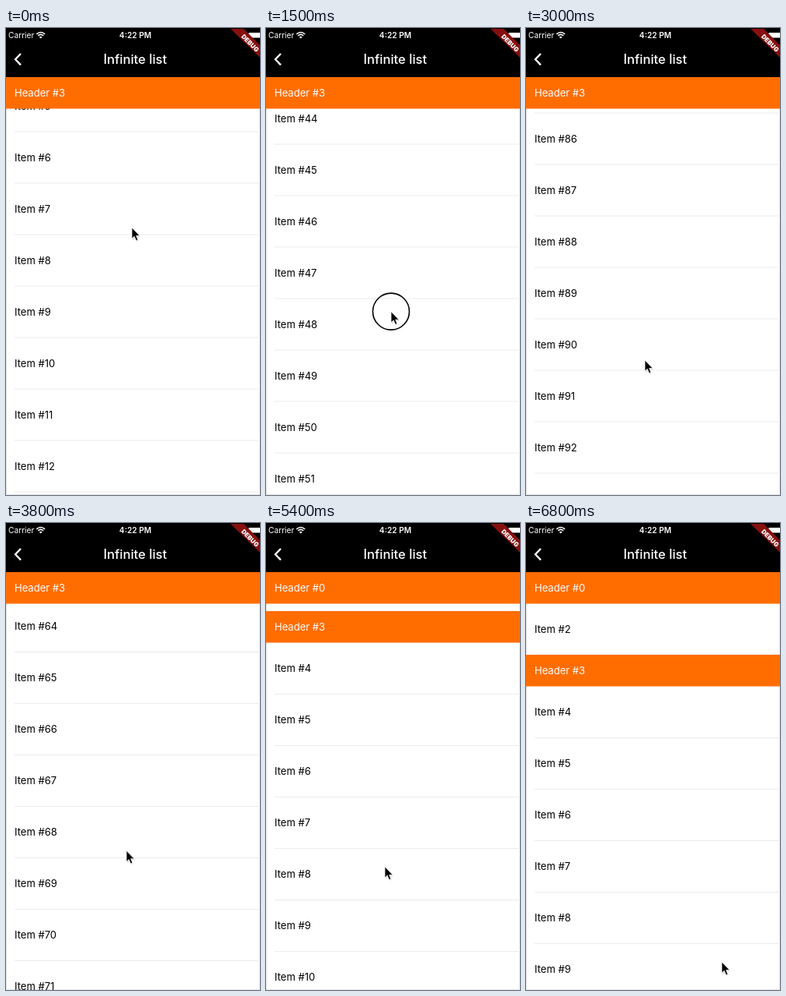
An HTML page for the animation above (6.9 s loop, 327x599 px).

```html
<!DOCTYPE html>
<html lang="en">
<head>
<meta charset="utf-8">
<title>Infinite list</title>
<style>
  html, body { margin: 0; width: 100%; height: 100%; overflow: hidden; background: #fff; }
  svg { display: block; width: 327px; height: 599px; }
  text { font-family: Inter, Roboto, sans-serif; font-size: 13px; }
</style>
</head>
<body>
<svg viewBox="0 0 327 599">
  <rect width="327" height="599" fill="#fff"/>
  <path d="M.5 63V598.5H326.5V63" fill="none" stroke="#e3e3e3"/>
  <g id="rows"></g>
  <g id="heads"></g>

  <rect width="327" height="63" fill="#000"/>
  <g fill="#fff">
    <text x="3" y="13.3" style="font-size:10.2px">Carrier</text>
    <text x="166.5" y="13.3" text-anchor="middle" style="font-size:10.2px;font-weight:600">4:22 PM</text>
    <text x="166.3" y="46" text-anchor="middle" style="font-size:16.6px;font-weight:500">Infinite list</text>
    <rect x="312" y="6" width="18" height="6.5" rx="1.5"/>
    <path d="M44.7 13.6L42.7 11.4Q44.7 9.9 46.7 11.4Z"/>
  </g>
  <g fill="none" stroke="#fff">
    <path d="M41.2 9.9Q44.7 6.9 48.2 9.9M39.3 7.9Q44.7 3.1 50.1 7.9" stroke-width="1.6"/>
    <path d="M19 33L12 40.2L19 47.4" stroke-width="2.3"/>
  </g>
  <path d="M289 1H306L327 22V38Z" fill="#85100f"/>
  <text transform="translate(314.5 19.2) rotate(45)" y="3" text-anchor="middle" fill="#fff"
        style="font-size:8px;font-weight:900">DEBUG</text>
  <rect width="327" height="1" fill="#000"/>

  <g id="pointer">
    <circle id="ring" r="23.5" fill="none" stroke="#000" stroke-width="1.6"/>
    <path d="M1 2V16L4.2 13.2L6.5 18L8.7 17L6.8 12.2H11Z" fill="#000" opacity=".14"/>
    <path d="M0 0V14.2L3.2 11.3L5.5 16.7L7.9 15.7L5.7 10.5H10.2Z" fill="#000" stroke="#fff" stroke-width=".8"/>
  </g>
</svg>
<script>
  const LOOP = 6900, STEP = 100;
  const TOP = 63, HEAD = 40.5, ROW = 66, BOTTOM = 599;

  // [time, value] pairs
  const scroll = [
    [0, 275], [300, 590], [700, 800], [900, 1006], [1000, 1150], [1400, 2480],
    [1600, 3250], [1800, 4560], [2100, 5929], [2200, 6110], [2500, 6120],
    [2750, 5965], [3000, 5579], [3400, 4960], [3600, 4660], [4000, 3560],
    [4600, 2214.5], [4800, 1880], [5000, 1320], [5300, 360], [5500, 0],
    [5900, 0], [6300, 42], [6600, 63], [6800, 66.5]
  ];
  const pointX = [[0, 162], [900, 169], [2100, 153], [3000, 153], [4600, 157], [5900, 151], [6400, 165], [6800, 252]];
  const pointY = [
    [0, 256], [600, 425], [700, 415], [900, 231], [1000, 185], [1350, 410],
    [1450, 400], [1650, 200], [2100, 254], [2500, 256], [2800, 420], [3000, 426],
    [3400, 235], [3500, 240], [3700, 430], [4200, 300], [4600, 212], [4700, 218],
    [4900, 420], [5900, 448], [6300, 406], [6800, 563]
  ];
  const presses = [[700, 1000], [1400, 1600], [2200, 2800], [3500, 3700], [4700, 4900], [5800, 6400]];

  // Monotone cubic interpolation
  function sample(keys, t) {
    const last = keys.length - 1;
    if (t >= keys[last][0]) return keys[last][1];
    const slope = i => (keys[i + 1][1] - keys[i][1]) / (keys[i + 1][0] - keys[i][0]);
    const tangent = i => {
      if (i === 0) return slope(0);
      if (i === last) return slope(last - 1);
      const a = slope(i - 1), b = slope(i);
      return a * b <= 0 ? 0 : 2 * a * b / (a + b);
    };
    let i = 0;
    while (t >= keys[i + 1][0]) i++;
    const [t0, v0] = keys[i], [t1, v1] = keys[i + 1];
    const d = t1 - t0, u = (t - t0) / d, w = 1 - u;
    return v0 * (1 + 2 * u) * w * w + v1 * u * u * (3 - 2 * u)
      + d * u * w * (tangent(i) * w - tangent(i + 1) * u);
  }

  const el = id => document.getElementById(id);
  function add(parent, name, attrs) {
    const node = document.createElementNS('http://www.w3.org/2000/svg', name);
    for (const key in attrs) node.setAttribute(key, attrs[key]);
    return parent.appendChild(node);
  }
  const move = (node, x, y) => node.setAttribute('transform', `translate(${x} ${y})`);

  const rows = Array.from({ length: 11 }, () => {
    const g = add(el('rows'), 'g', {});
    add(g, 'rect', { x: 11, y: ROW - 0.5, width: 316, height: 1, fill: '#ebebeb' });
    return { g, label: add(g, 'text', { x: 11, y: 37.6, fill: '#000' }) };
  });

  function makeHead(n) {
    const g = add(el('heads'), 'g', {});
    add(g, 'rect', { width: 327, height: HEAD, fill: '#ff6d00' });
    add(g, 'text', { x: 11, y: 25.3, fill: '#fff' }).textContent = 'Header #' + n;
    return g;
  }
  const firstHead = makeHead(0), nextHead = makeHead(3);

  const nextTop = TOP + HEAD + 2 * ROW;
  const rowTop = n => n < 3 ? TOP + HEAD + (n - 1) * ROW : nextTop + HEAD + (n - 4) * ROW;

  function draw(t) {
    const offset = Math.round(sample(scroll, t) * 2) / 2;
    let n = Math.max(1, Math.floor(offset / ROW) - 1);
    for (const { g, label } of rows) {
      if (n === 3) n++;
      const y = rowTop(n) - offset;
      g.style.display = y + ROW > TOP && y < BOTTOM ? '' : 'none';
      label.textContent = 'Item #' + n++;
      move(g, 0, y);
    }
    const headY = Math.max(TOP, nextTop - offset);
    move(nextHead, 0, headY);
    move(firstHead, 0, Math.min(TOP, nextTop - offset - HEAD));

    move(el('pointer'), sample(pointX, t), sample(pointY, t));
    el('ring').style.display = presses.some(([a, b]) => t >= a && t < b) ? '' : 'none';
  }

  const start = performance.now();
  function tick() {
    const t = (performance.now() - start) % LOOP;
    draw(Math.floor(t / STEP) * STEP);
    requestAnimationFrame(tick);
  }
  tick();
</script>
</body>
</html>
```
